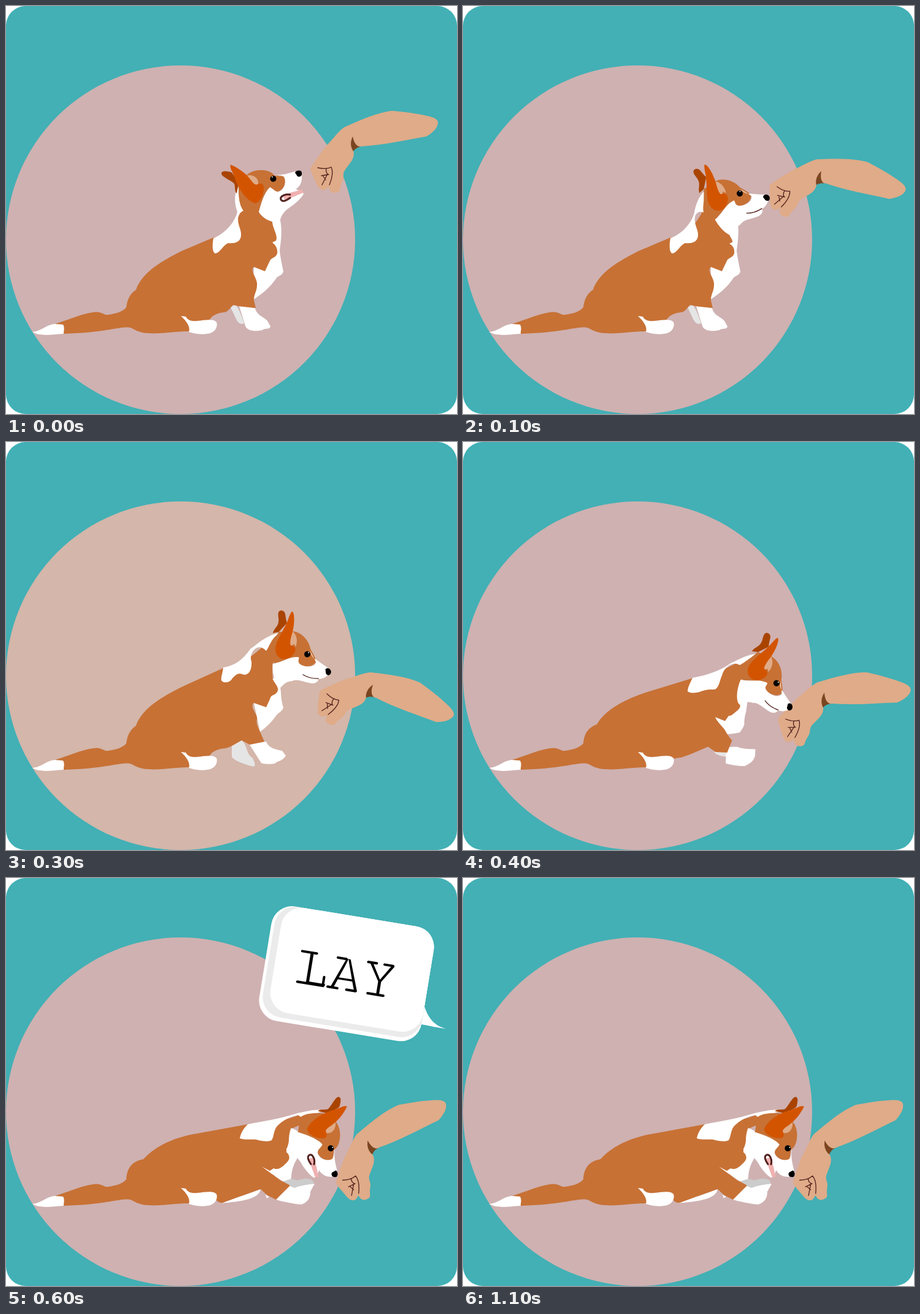
These frames come from a looping animation (735 px wide and 666 px high, 1.7 s). An HTML page:

```html
<!DOCTYPE html>
<html lang="en">
<head>
<meta charset="utf-8">
<title>Lay</title>
<style>
html, body { margin: 0; width: 100%; height: 100%; overflow: hidden; background: #fff; }
svg { display: block; width: 100%; height: 100%; }
.coat { fill: #c77135; }
.white { fill: #fff; }
.skin { fill: #dfab88; }
.ear { fill: #d35400; }
.far-ear { fill: #a94400; }
.line { fill: none; stroke: #51201c; stroke-linecap: round; stroke-linejoin: round; }
.slab { fill: none; stroke: #000; stroke-width: 4; stroke-linecap: round; }
text { font: 80px "Liberation Mono", monospace; letter-spacing: 8px; stroke: #fff; stroke-width: 2.5; }
</style>
</head>
<body>
<svg viewBox="0 0 735 666">
  <rect width="735" height="666" rx="32" fill="#42b0b5"/>
  <circle id="disc" cx="284.5" cy="381.5" r="284.5"/>

  <g id="hand">
    <path class="skin" d="M704 190 C703 182 690 180 675 177 C660 174 640 172 629 171 C605 174 580 185 551 198 C540 206 530 221 523 227 C515 237 505 251 496 265 C497 272 502 280 507 292 C510 298 514 302 520 300 L526 295 C527 303 532 307 540 304 C545 303 544 298 546 292 C553 278 548 278 551 270 C558 258 570 250 566 236 C570 231 575 230 580 229 C615 227 650 219 685 213 C695 207 704 199 704 190Z"/>
    <path fill="#7a4520" d="M565 213 C561 221 561 230 566 237 C570 232 574 230 578 230 C570 229 567 222 565 213Z"/>
    <path class="line" stroke-width="1.3" d="M508 264 C516 266 524 266 530 263 C534 271 531 282 527 292 M522 265 C521 269 521 272 525 275 M514 277 L526 275 M524 274 L515 292 M517 278 L521 284"/>
  </g>

  <path class="coat" d="M80 519 C105 511 130 500 148 499.500 C158 500 160 505 166 504 C180 502 190 499 196 492 L230 470 L320 470 L335 508 L330 514 L299 531 C275 531 245 537 222 533 C210 530 207 526 202 525 C188 522 165 533 94 535Z"/>
  <path class="white" d="M43 532 C60 530 65 520 80 519 L93 520 C96 525 94 530 94 535 C75 536 55 540 43 532Z"/>
  <path id="chest" class="white"/>
  <path id="far"/>
  <path id="leg" class="white"/>
  <path id="coat" class="coat"/>
  <path id="belly" class="white" d="M345 531 C375 529 412 526 415 508 C400 514 375 522 354 530Z M417 471 L436 485 L427 477Z M423 517 L425 523 L429 520Z"/>
  <path id="patch" class="white"/>
  <path class="white" d="M285 506 L293 507 C296 513 302 515 312 514 C325 513 338 510 343 516 C346 524 340 534 328 535 C315 537 305 534 298 532 C301 524 294 514 285 506Z"/>

  <g id="open">
    <path class="far-ear" d="M351 274 C351 268 360 270 366 271 C370 272 374 282 379 290 L376 306 C372 302 374 296 372 290 C366 284 353 280 351 274Z"/>
    <path class="coat" d="M383 290 C385 278 400 267 416 268 C424 268 430 270 434 273 L438 277 L454 278 C457 288 453 300 443 303 C436 303 434 297 430 296 C422 305 418 325 413 337 L387 334 C380 325 379 310 379 297Z"/>
    <path class="white" d="M437 275 C450 277 460 273 471 270 L482 278 C483 288 478 296 472 299 L483 303 L485 307 C480 315 472 322 465 327 C455 333 447 342 446 354 L434 352 C426 350 416 344 412 336 C415 325 420 305 430 296 C436 298 438 304 445 303 C455 299 457 286 453 279 C448 275 442 277 437 275Z"/>
    <path fill="#f0b0b0" d="M452 310 C466 302 478 302 483 299 L484 305 C476 308 468 312 454 317Z"/>
    <path class="line" stroke-width="3" d="M463 308 C455 306 446 311 448 316 C451 321 458 317 463 313"/>
    <path class="skin" d="M391 277 C402 274 412 280 411 290 L407 295 L402 288Z"/>
    <path class="ear" d="M366 259 C378 264 392 273 402 288 C406 292 407 292 410 291 C416 288 420 290 420 297 C420 312 412 322 406 322 C392 318 378 298 372 278 C369 270 364 264 366 259Z"/>
    <path d="M471 272 C474 267 482 268 482 272 C483 277 479 280 475 278Z"/>
    <circle cx="435.5" cy="282" r="5"/><circle class="white" cx="434" cy="279" r="1"/>
  </g>

  <g id="closed">
    <path class="far-ear" d="M407 272 C409 267 416 268 418 273 C420 278 422 284 424 287 L414 304 L405 308 C405 300 411 296 410 288 C410 282 406 278 407 272Z"/>
    <path class="coat" d="M437 298 C450 297 465 307 470 320 C474 326 482 332 483 339 C482 346 474 350 463 350 C455 348 455 342 452 341 C450 336 430 350 417 356 L405 330 L414 304Z"/>
    <path class="white" d="M470 323 C474 330 477 335 484 336 C492 340 500 343 505 345 L509 352 C506 360 500 364 493 366 C494 370 490 374 484 375 C470 376 460 372 452 378 C444 380 440 385 436 392 C428 392 418 375 415 357 C430 352 438 340 452 338 C458 336 452 345 458 348 C468 352 482 350 484 340 L478 333Z"/>
    <path class="skin" d="M435 298 C442 301 448 310 446 322 L442 318 L439 323 L434 321Z"/>
    <path class="ear" d="M428 267 C432 266 436 282 436 296 C436 306 434 312 437 321 C444 321 448 324 446 332 C442 342 435 346 428 346 C418 345 413 335 414 325 C415 312 424 292 425 278 C426 272 427 268 428 267Z"/>
    <path d="M501 348 C504 342 512 347 511 352 C510 358 505 357 503 354Z"/>
    <circle cx="467" cy="330" r="5"/><circle class="white" cx="468.5" cy="327" r="1"/>
    <path class="line" stroke-width="1.3" d="M467 364 C475 367 485 367 493 365"/>
  </g>

  <g id="bubble">
    <path class="white" d="M682 210 C688 228 698 242 718 246 C705 245 690 241 677 239Z"/>
    <g transform="translate(555 155.5) rotate(9.3)">
      <rect class="white" x="-134" y="-94" width="268" height="189.5" rx="34"/>
      <rect fill="#ebebeb" x="-129" y="-94" width="263" height="183" rx="34"/>
      <rect class="white" x="-118" y="-94" width="252" height="174" rx="34"/>
      <text x="0" y="28" dx="7 -7" text-anchor="middle">LAY</text>
      <path class="slab" d="M-77 -24 H-53 M-77 26.500 H-35 V12 M-27 26.500 H-11 M4 26.500 H19 M-18 -23 H-4 M32 -24 H46 M59 -24 H73 M39 26.500 H65"/>
    </g>
  </g>
</svg>
<script>
const $ = id => document.getElementById(id);
const LOOP = 1700, STEP = 100;

const rump = 'M196 492 C198 478 202 470 212 463 C222 434 255 416 286 400 ';
const foreleg = 'C440 391 443 396 442 404 C440 411 432 411 430 416 L422 433 L404 426 C396 432 411 445 409 456 C409 466 404 470 404 480 L407 493 L379 490 L370 488 C362 497 360 500 355 500 C345 501 336 505 330 513 L230 510Z';
const saddle = 'C336 390 336 402 341 404 C350 402 352 392 362 387 C372 388 382 386 383 375 ';

const sit = {
  coat: rump + 'L338 378 C360 376 378 352 381 338 L379 297 L415 335 C420 346 428 350 434 352 C434 362 444 375 440 383 L434 386 ' + foreleg,
  chest: 'M434 350 L447 350 C451 370 447 390 446 400 C448 415 451 428 452 433 C450 441 444 439 440 445 C430 460 415 472 403 479 L404 426Z',
  patch: 'M377 296 C371 310 373 325 377 336 C374 350 360 370 338 379 ' + saddle + 'C384 365 378 360 378 346 C379 340 383 336 387 334 C380 325 379 310 379 297Z',
  leg: 'M380 490 L406 493 C408 505 420 507 426 514 L431 523 C430 529 422 525 418 529 C405 532 392 530 390 522Z',
  far: 'M366 492 L374 487 C380 495 384 505 388 518 C382 521 378 517 374 509 C372 504 370 500 366 492Z'
};
const sniff = {
  ...sit,
  coat: rump + 'L338 378 C370 374 385 352 397 338 L414 304 L417 356 C418 375 428 388 434 392 C434 390 436 388 438 388 L434 390 ' + foreleg,
  patch: 'M414 304 C395 312 385 328 377 338 C374 352 360 372 338 379 ' + saddle + 'C384 365 374 355 378 342 C381 333 390 333 397 340 C400 325 408 312 414 304Z'
};
const lean = {
  coat: rump + 'L354 369 C386 366 408 342 424 330 L445 311 L436 358 C433 370 434 380 435 388 C437 392 441 396 443 402 L443 402 C444 408 440 411 436 413 C432 414 431 417 430 420 L424 433 L404 426 C396 432 411 445 409 452 C407 460 412 468 414 473 L421 489 L397 494 L384 487 C375 492 365 499 357 500 C345 501 336 505 330 513 L230 510Z',
  chest: 'M436 385 L445 390 C449 408 448 415 449 420 C450 428 451 430 452 433 C450 441 444 441 440 447 C432 458 424 466 414 473 L404 426Z',
  patch: 'M447 311 C425 315 412 328 398 338 C385 357 372 365 354 368 C353 378 350 384 351 389 C354 395 366 392 368 387 C376 377 380 377 388 380 C398 380 401 368 400 358 C395 345 410 325 424 341 C430 333 432 320 447 311Z',
  leg: 'M397 494 L424 489 C428 500 440 502 450 504 L456 512 C450 522 442 520 438 525 C430 526 420 526 416 524Z',
  far: 'M368 493 L384 487 C394 495 390 508 402 516 C408 528 406 531 400 529 C385 525 372 520 368 514Z'
};
const lie = {
  coat: 'M196 492 C197 473 206 462 224 459 C245 435 280 422 312 417 L394 402 C420 402 450 397 475 388 L500 382 L490 400 C470 405 464 412 465 407 C458 425 464 432 457 442 L457 447 C462 452 464 458 458 464 C452 470 445 478 436 474 L430 478 L418 472 C430 480 440 488 448 494 C455 497 460 500 463 502 L440 525 L426 518 L415 508 C400 513 375 522 354 530 C350 531 345 530 340 522 L230 510Z',
  chest: 'M464 407 L484 418 C480 440 476 450 474 459 C468 468 465 480 465 488 C464 492 464 498 463 501 C450 495 440 488 430 482 L418 472Z',
  patch: 'M518 380 C505 376 490 381 475 384 C450 392 420 397 394 402 C388 408 383 415 381 425 C390 428 400 426 408 427 C418 430 428 431 433 428 C438 420 435 410 445 402 C455 393 468 388 477 387 C480 394 495 388 518 380Z',
  leg: 'M461 502 L470 506 C480 502 492 500 503 499 L496 512 C496 524 490 530 481 533 C468 532 450 528 440 525Z',
  far: 'M452 495 L462 492 C472 490 472 496 480 492 C495 488 505 495 500 499 C485 502 472 512 452 501 C452 499 452 497 452 495Z'
};

// Halfway body between two bodies whose paths share the same commands.
function between(a, b) {
  const body = {};
  for (const part in a) {
    const end = b[part].match(/\d+/g);
    let i = 0;
    body[part] = a[part].replace(/\d+/g, n => (+n + +end[i++]) / 2);
  }
  return body;
}

const pivot = { hand: [622, 246.5], open: [421.5, 266.5], closed: [467.5, 308.5] };
const pink = '#cfb1b1', grey = '#e5e5e5';

// hand and at: x, y, angle of the pivot
const poses = [
  { body: sit, head: 'open', at: [421.5, 266.5, 0], hand: [622, 246.5, 0] },
  { body: between(sit, sniff), head: 'closed', at: [444.5, 285.5, -19], hand: [624, 322, 22.3] },
  { body: sniff, head: 'closed', at: [467.5, 308.5, 0], hand: [625.5, 397.5, 44.6] },
  { body: lean, head: 'closed', at: [496, 325.5, 12], hand: [630, 454, 30.6], disc: '#d4b6aa' },
  { body: between(lean, lie), head: 'closed', at: [523, 376, 33], hand: [641, 450, 7.6] },
  { body: lie, head: 'open', at: [545.5, 428, 92.9], hand: [653.5, 445, -16], far: '#ccc' }
];

function place(id, [x, y, angle]) {
  const [px, py] = pivot[id];
  $(id).setAttribute('transform', `translate(${x} ${y}) rotate(${angle}) translate(${-px} ${-py})`);
}

const show = (id, on) => { $(id).style.display = on ? '' : 'none'; };

function setPose(pose) {
  for (const part in pose.body) $(part).setAttribute('d', pose.body[part]);
  $('far').setAttribute('fill', pose.far || grey);
  $('disc').setAttribute('fill', pose.disc || pink);
  show('belly', pose.body === lie);
  show('open', pose.head === 'open');
  show('closed', pose.head === 'closed');
  place(pose.head, pose.at);
  place('hand', pose.hand);
}

const start = performance.now();
let current;
function draw(now) {
  const t = Math.max(0, now - start) % LOOP;
  const pose = poses[Math.min(Math.floor(t / STEP), poses.length - 1)];
  if (pose !== current) setPose(current = pose);
  show('bubble', t >= 600 && t < 1100);
  requestAnimationFrame(draw);
}
draw(start);
</script>
</body>
</html>
```
